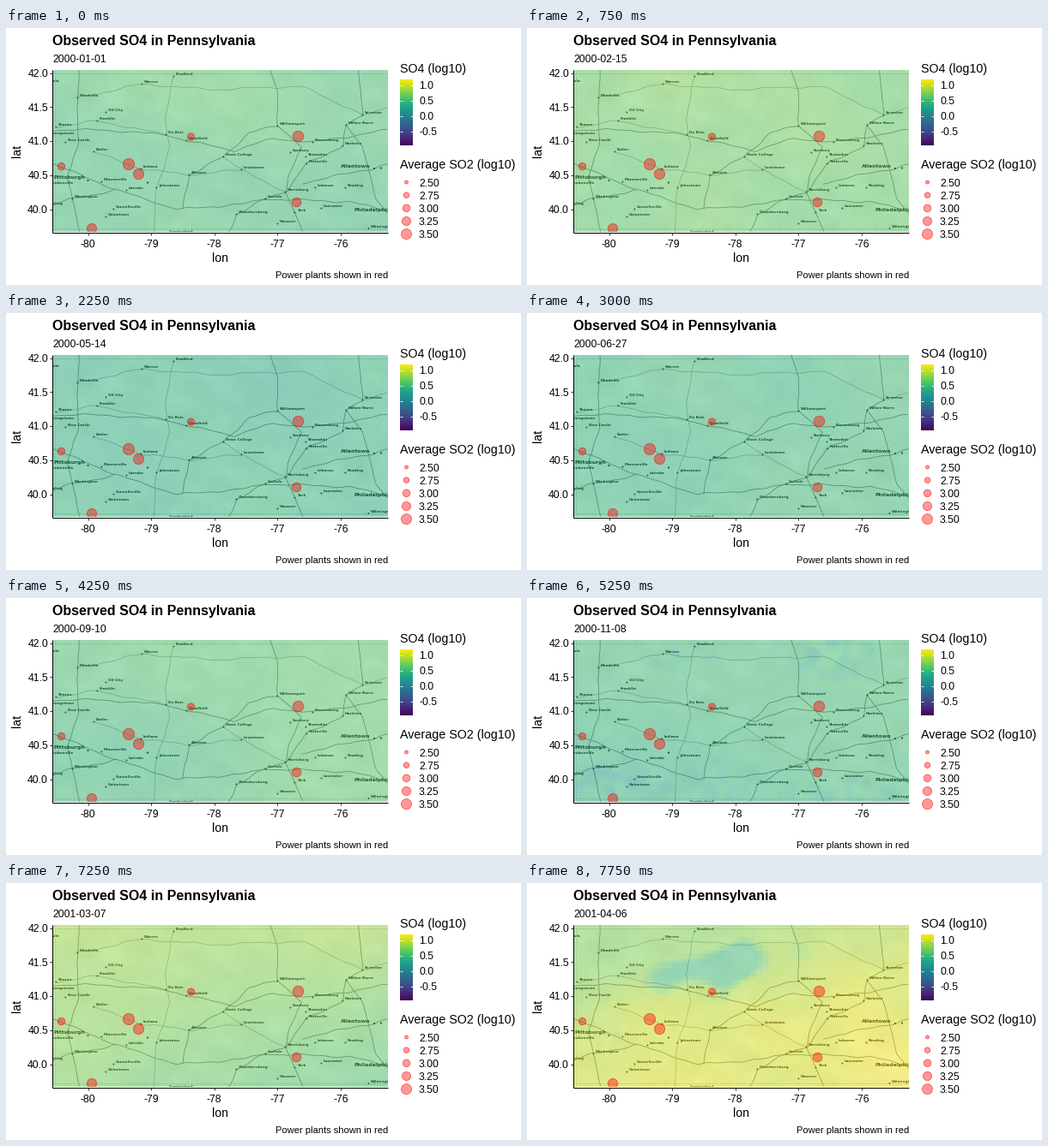
These frames come from a looping animation (600x300 px, 8000 ms). A matplotlib script:

```python
import numpy as np
import matplotlib.pyplot as plt
from matplotlib.animation import FuncAnimation
from matplotlib.patches import Circle

W, H, DPI = 600, 300, 100
PX = 72 / DPI
FRAMES, INTERVAL = 32, 250
X0, X1, Y0, Y1 = 54.5, 444.5, 49, 238

plt.rcParams["font.family"] = "Liberation Sans"
fig = plt.figure(figsize=(W / DPI, H / DPI), dpi=DPI, facecolor="white")


def pixel_axes(x0, y0, x1, y1):
    ax = fig.add_axes([x0 / W, 1 - y1 / H, (x1 - x0) / W, (y1 - y0) / H])
    ax.axis("off")
    return ax


def set_limits(ax, x0, y0, x1, y1):
    ax.set_xlim(x0, x1)
    ax.set_ylim(y1, y0)


stage = pixel_axes(0, 0, W, H)
panel = pixel_axes(X0, Y0, X1, Y1)


def label(x, y, s, size, **kw):
    kw.setdefault("va", "baseline")
    return stage.text(x, y, s, fontsize=size * PX, color="black", **kw)


def line(ax, xs, ys, color="black", width=1.0, **kw):
    ax.plot(xs, ys, color=color, lw=width * PX, **kw)


def dot(ax, x, y, r):
    ax.add_patch(Circle((x, y), r, fc=(1, 0, 0, 0.4), ec=(1, 0, 0, 0.55),
                        lw=0.9 * PX, zorder=6))


# --- sulfate fields, 0..1 on the viridis scale -------------------------------
COLS, ROWS = 195, 94
u, v = np.meshgrid((np.arange(COLS) + 0.5) / COLS, (np.arange(ROWS) + 0.5) / ROWS)


def waves(seed, freq, n=14, x=u, y=v):
    """Smooth noise of roughly unit spread."""
    rng = np.random.default_rng(seed)
    out = np.zeros_like(x)
    for _ in range(n):
        a, k, p = rng.uniform(0, 2 * np.pi), freq * rng.uniform(0.5, 1.5), rng.uniform(0, 6.3)
        out += np.cos(k * (2 * x * np.cos(a) + y * np.sin(a)) + p)
    return out / np.sqrt(n / 2)


def bump(cx, cy, sx, sy):
    return np.exp(-((u - cx) / sx) ** 2 - ((v - cy) / sy) ** 2)


def patchy_winter():
    spots = (bump(0.1, 0.86, 0.12, 0.1) + 0.7 * bump(0.33, 0.1, 0.09, 0.08)
             + 0.8 * bump(0.78, 0.1, 0.14, 0.13) + 0.5 * bump(0.85, 0.95, 0.2, 0.12)
             + 0.4 * bump(0.4, 0.9, 0.2, 0.12))
    speckle = np.clip(0.5 + 0.5 * waves(8, 45), 0, 1.3)
    return 0.625 + 0.03 * (1 - v) + 0.008 * waves(9, 30) - 0.2 * spots * speckle


def blocky_spring():
    bx, by = np.floor(u * 78) / 78, np.floor(v * 38) / 38
    along = (bx - 0.43) * 0.8 - (by - 0.25) * 0.55
    across = (bx - 0.43) * 0.55 + (by - 0.25) * 0.8
    band = np.exp(-(along / 0.25) ** 2 - (across / 0.12) ** 2)
    band = band + 0.14 * waves(4, 16, x=bx, y=by)
    rise = 1 / (1 + np.exp(-(v + 0.45 * u - 0.62) * 8))
    return (0.80 + 0.13 * rise + 0.04 * u + 0.012 * waves(5, 9)
            - 0.17 * np.clip((band - 0.38) * 2.8, 0, 1))


fields = [
    0.70 + 0.012 * waves(1, 6) + 0.02 * (0.5 - v),
    0.795 + 0.012 * waves(2, 6) + 0.02 * bump(0.35, 0.2, 0.3, 0.3),
    0.645 + 0.010 * waves(3, 6) - 0.03 * bump(0.5, 0.05, 0.25, 0.25),
    0.71 + 0.03 * u - 0.07 * bump(0.15, 0.75, 0.35, 0.4) + 0.006 * waves(6, 6),
    patchy_winter(),
    0.845 - 0.14 * v * (0.4 + 0.6 * u) + 0.006 * waves(7, 6),
    blocky_spring(),
]
key_steps = [0, 5, 9, 17, 25, 29, 31]


def field_at(i):
    k = min(np.searchsorted(key_steps, i, side="right") - 1, len(key_steps) - 2)
    a, b = key_steps[k], key_steps[k + 1]
    t = (i - a) / (b - a)
    return (1 - t) * fields[k] + t * fields[k + 1]


# --- grey base map -----------------------------------------------------------
extent = (X0, X1, Y1, Y0)
relief = 0.945 + 0.011 * waves(11, 28) + 0.006 * waves(12, 60)
panel.imshow(relief, cmap="gray", vmin=0, vmax=1, extent=extent, aspect="auto",
             interpolation="bilinear", zorder=0)

# text left edge and middle of each town name
towns = {
    "Bradford": (198, 54), "Warren": (161, 63), "Meadville": (86, 79),
    "Oil City": (119, 96), "Franklin": (109, 106), "Sharon": (61, 113),
    "New Castle": (72, 131), "Butler": (105, 142), "Du Bois": (189, 122),
    "Clearfield": (213, 129), "Monroeville": (114, 177), "Indiana": (160, 162),
    "Latrobe": (143, 187), "Johnstown": (178, 184), "Altoona": (216, 169),
    "State College": (256, 148), "Lewistown": (277, 163), "Washington": (80, 197),
    "Connellsville": (128, 209), "Uniontown": (119, 218), "Cumberland": (190, 237.5),
    "Chambersburg": (271, 215), "Carlisle": (305, 197), "Harrisburg": (328, 189),
    "Lebanon": (363, 184), "Reading": (398, 184), "Lancaster": (370, 208),
    "York": (339, 213), "Hanover": (319, 226), "Williamsport": (319, 112),
    "Bloomsburg": (360, 131), "Sunbury": (334, 143), "Shamokin": (352, 148),
    "Pottsville": (353, 156), "Hazleton": (395, 135), "Scranton": (418, 99),
    "Wilkes-Barre": (399, 111), "Wilmington": (425, 231.5),
}
cut_left = {"Ashtabula": (63, 62), "Youngstown": (79, 123), "Steubenville": (79, 181),
            "Wheeling": (67, 205)}
cities = {"Pittsburgh": (56, 174), "Allentown": (390, 161), "Philadelphia": (406, 212)}


def town_dot(name):
    x, y = towns[name]
    return x - 2.6, y + 2.5


# roads run through towns and a few free points
highways = [
    [(85, 49), "Meadville", (84, 133), (72, 176), "Washington", (86, 238)],
    [(54, 119), (112, 119), "Du Bois", "Clearfield", (265, 143), (312, 129),
     "Bloomsburg", (445, 119)],
    [(54, 158), (126, 188), (200, 212), (280, 205), "Carlisle", (402, 203), (445, 214)],
    [(54, 207), "Washington", (128, 189)],
    [(206, 211), "Altoona", "State College", (283, 122), "Williamsport"],
    [(308, 49), (316, 74), "Williamsport", (344, 138), (329, 176), "Harrisburg",
     "York", (346, 238)],
    [(260, 238), "Chambersburg", "Carlisle", "Harrisburg", "Pottsville", "Hazleton",
     "Wilkes-Barre", "Scranton", (411, 49)],
    [(345, 181), (426, 164), (445, 159)],
    ["Wilkes-Barre", (416, 140), (431, 200), (445, 217)],
]
byroads = [
    ["Scranton", (445, 92)],
    ["Sharon", "Franklin", "Du Bois"],
    ["State College", "Lewistown", "Harrisburg"],
    ["Butler", "Indiana", "Altoona", "Lewistown"],
    ["Bradford", (185, 106), (191, 140), "Johnstown", (172, 238)],
    ["Meadville", "Warren", (240, 72), (345, 68), "Scranton"],
]


def draw_road(stops, phase, color):
    pts = [town_dot(s) if isinstance(s, str) else s for s in stops]
    px, py = np.array(pts, float).T
    run = np.concatenate([[0], np.cumsum(np.hypot(np.diff(px), np.diff(py)))])
    s = np.arange(0, run[-1], 2.0)
    wob = 0.9 * np.sin(s / 11 + phase) + 0.5 * np.sin(s / 4.3 + 2 * phase)
    line(panel, np.interp(s, run, px) + 0.5 * wob, np.interp(s, run, py) + wob,
         color, 0.75, zorder=1)


for k, stops in enumerate(highways):
    draw_road(stops, k, "0.38")
for k, stops in enumerate(byroads):
    draw_road(stops, k, "0.6")

for y in (52.5, 234):
    line(panel, [57, 445], [y, y], "0.62", 0.7, ls=(0, (3, 2)), zorder=1)
line(panel, [57, 57], [49, 238], "0.7", 0.6, ls=(0, (3, 2)), zorder=1)


def place(name, x, y, size, ha="left"):
    panel.text(x, y + 0.36 * size, name, fontsize=size * PX, family="DejaVu Sans",
               weight="bold", color="black", ha=ha, va="baseline", clip_on=True, zorder=3)


def town_mark(x, y, r):
    panel.add_patch(Circle((x, y), r, fc="black", ec="none", zorder=3))


for name, (x, y) in towns.items():
    place(name, x, y, 4.15)
    town_mark(*town_dot(name), 0.95)
for name, (x, y) in cut_left.items():
    place(name, x, y, 4.15, "right")
for name, (x, y) in cities.items():
    place(name, x, y, 6.2)
for x, y in [(95.5, 178), (429, 164), (437, 163.5), (165, 180.5)]:
    town_mark(x, y, 1.1)

overlay = panel.imshow(fields[0], cmap="viridis", vmin=0, vmax=1, alpha=0.5, extent=extent,
                       aspect="auto", interpolation="nearest", zorder=5)

plants = [(64.5, 161.5, 4.2), (143, 159, 6.6), (154.5, 170.5, 6.1), (215.5, 127, 4.1),
          (340.5, 126.5, 6.2), (338.5, 203.5, 5.3), (100, 234, 5.6)]
for p in plants:
    dot(panel, *p)
set_limits(panel, X0, Y0, X1, Y1)

# --- titles, axes, legends ---------------------------------------------------
label(54, 20, "Observed SO4 in Pennsylvania", 16, weight="bold")
date_text = label(54, 40, "", 12.1)
label(445, 292, "Power plants shown in red", 11.1, ha="right")
label(249.5, 273, "lon", 14, ha="center")
label(13.5, 143.5, "lat", 14, ha="center", va="center", rotation=90)

line(stage, [54, 54], [49, 239], solid_capstyle="butt")
line(stage, [53.5, 445], [238.5, 238.5], solid_capstyle="butt")
for k in range(5):
    y = 52.5 + 39.75 * k
    line(stage, [50.5, 54], [y, y], "0.2", solid_capstyle="butt")
    label(49, y + 4.4, f"{42 - k / 2:.1f}", 12.2, ha="right")
    x = 95.5 + 73.6 * k
    line(stage, [x, x], [238.5, 242], "0.2", solid_capstyle="butt")
    label(x, 255.5, f"{k - 80}", 12.2, ha="center")

label(459, 52, "SO4 (log10)", 14.2)
stage.imshow(np.linspace(1, 0, 256)[:, None], cmap="viridis", extent=(459, 474, 137, 60),
             aspect="auto", interpolation="bilinear")
for k in range(4):
    y = 66.5 + 18 * k
    for x in (459, 471):
        line(stage, [x, x + 3], [y, y], "white", 0.8, solid_capstyle="butt")
    label(481, y + 4.4, f"{1 - k / 2:.1f}", 12.1)

label(459, 164, "Average SO2 (log10)", 14.2)
for k, r in enumerate([2.0, 3.3, 4.3, 5.1, 6.0]):
    y = 180 + 15.15 * k
    dot(stage, 466.5, y, r)
    label(481, y + 4.7, f"{2.5 + k / 4:.2f}", 12.1)
set_limits(stage, 0, 0, W, H)

START, SPAN_DAYS = np.datetime64("2000-01-01"), 461


def draw(i):
    overlay.set_data(field_at(i))
    date_text.set_text(str(START + int(round(SPAN_DAYS * i / (FRAMES - 1)))))
    return overlay, date_text


anim = FuncAnimation(fig, draw, frames=FRAMES, interval=INTERVAL, repeat=True,
                     repeat_delay=0, blit=False)
plt.show()
```
